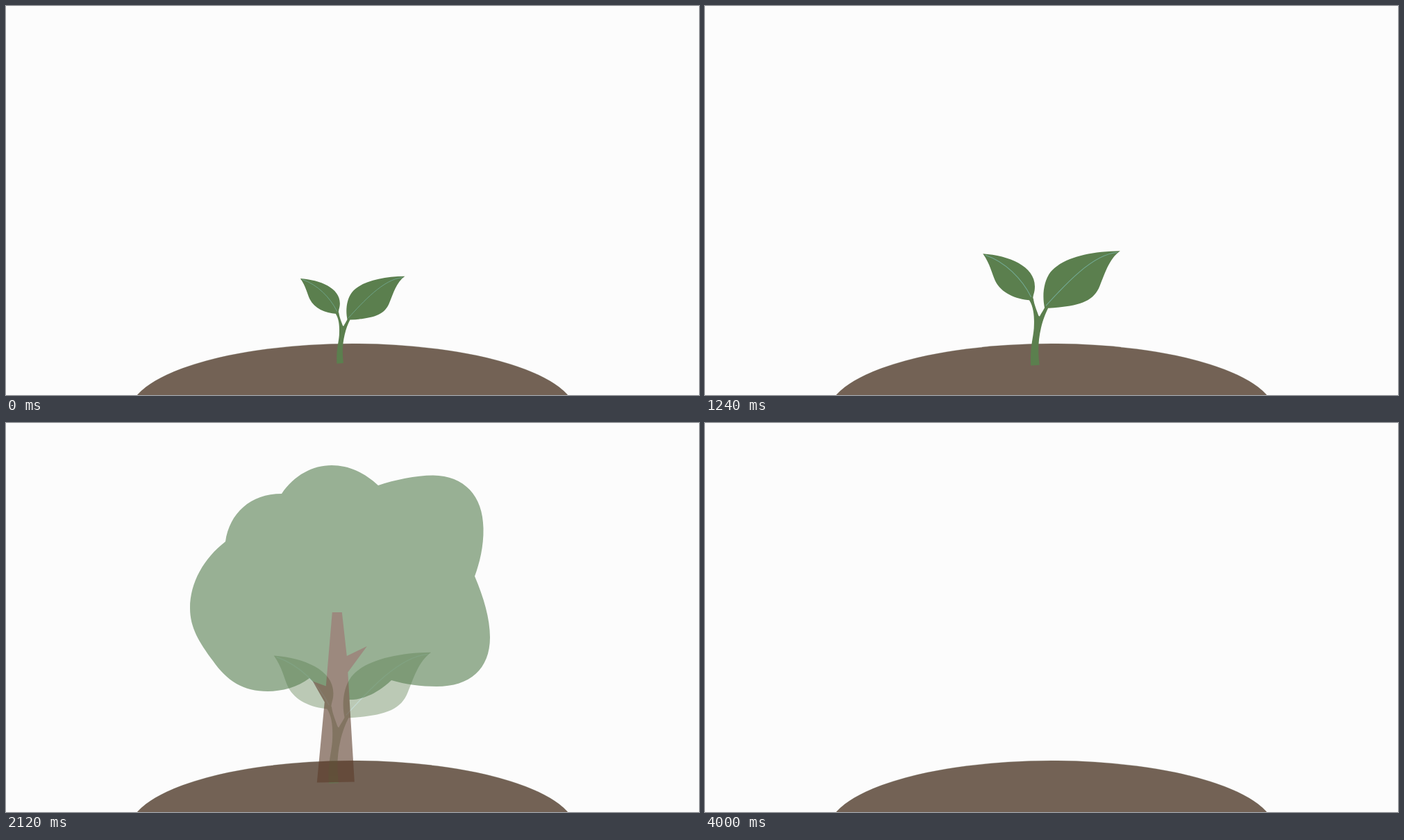
These frames come from a looping animation (998 by 561 pixels, 5000 ms). An HTML page:

```html
<!DOCTYPE html>
<html lang="en">
<head>
<meta charset="utf-8">
<title>Growing tree</title>
<style>
  html, body { margin: 0; width: 100%; height: 100%; overflow: hidden; background: #fcfcfc; }
  svg { display: block; width: 998px; height: 561px; }
</style>
</head>
<body>
<svg viewBox="0 0 998 561">
  <ellipse cx="499" cy="588.4" rx="322" ry="101.4" fill="#736255" stroke="#6b6456" stroke-opacity=".5" stroke-width=".6"/>
  <g id="sprout" fill="#5b7f4e">
    <path d="M463 414 C472 428 471 448 470.5 460 C469 478 464 490 465.5 520 L479.5 519
      C477 500 477 480 482 459 C485 446 489 436 493.5 427 L489 424 C485 432 482 436 480 440
      Q478.5 441 477.5 438 C475 430 471 422 469.5 411 Z"/>
    <path d="M388 339 C430 342 472 359 472 392 C472 402 469 405 469 412 L465 414.5
      C440 412 418 403 408 383 C402 370 400 356 388 339 Z"/>
    <path d="M488 427 C484 410 485 385 497.5 368.5 C515.5 346.5 559 335 610 334.4
      C592 347 585 372 577 391 C567 417 542 424 494 427 Z"/>
    <path d="M392 341 C424 352 451 379 466 409 M490 423 C520 390 565 340 605 337"
      fill="none" stroke="#73aa94" stroke-width="1.2"/>
  </g>
  <g id="tree">
    <path id="crown" fill="#557d4f" d="M316 171 C322 130 352 102 397 102 C415 75 442 61 469 61
      C494 61 517 72 536 90 C560 82 590 75.5 615 75.5 C660 76 687 105 687.5 152
      C688 178 682 202 675 221 C688 252 697 282 697 309 C697 355 668 380 620 380
      C598 380 575 377 555 371 C530 395 505 400 495 399 C470 396 455 388 437 368
      C420 381 397 387 377 387 C342 387 318 372 298 343 C278 316 265 295 265 267
      C265 230 285 195 316 171 Z"/>
    <path id="trunk" fill="#5c3c2b" d="M470 271.5 H484 L491 334.5 L520 320.5 L492.5 358
      L502 516 L448 517 L459 401 L442 371 L461 378 Z"/>
  </g>
</svg>
<script>
  const LOOP = 5000, STEP = 40;
  const GROWN = 2000, FADE = 200, BARE = 3000, GONE = 4000;
  const [sprout, tree, crown, trunk] =
    ['sprout', 'tree', 'crown', 'trunk'].map(id => document.getElementById(id));

  const set = (el, name, value) => el.setAttribute(name, value);
  const clamp = v => Math.min(1, Math.max(0, v));

  function draw(time) {
    const t = Math.floor(time % LOOP / STEP) * STEP;
    const scale = 0.678 + 0.3426 * clamp(t / GROWN);
    const fade = clamp((t - GROWN) / FADE);

    // The sprout grows from a point just under the soil line.
    set(sprout, 'transform', `translate(499.5 506.5) scale(${scale}) translate(-499.5 -506.5)`);
    set(sprout, 'opacity', 1 - fade);
    set(tree, 'opacity', t < GONE ? fade : 0);
    set(crown, 'opacity', t < BARE ? 1 : 0);
    set(trunk, 'transform', t < BARE ? 'translate(-0.2 1.5)' : 'translate(0 0)');
  }

  const start = performance.now();
  function tick() {
    draw(performance.now() - start);
    requestAnimationFrame(tick);
  }
  tick();
</script>
</body>
</html>
```
